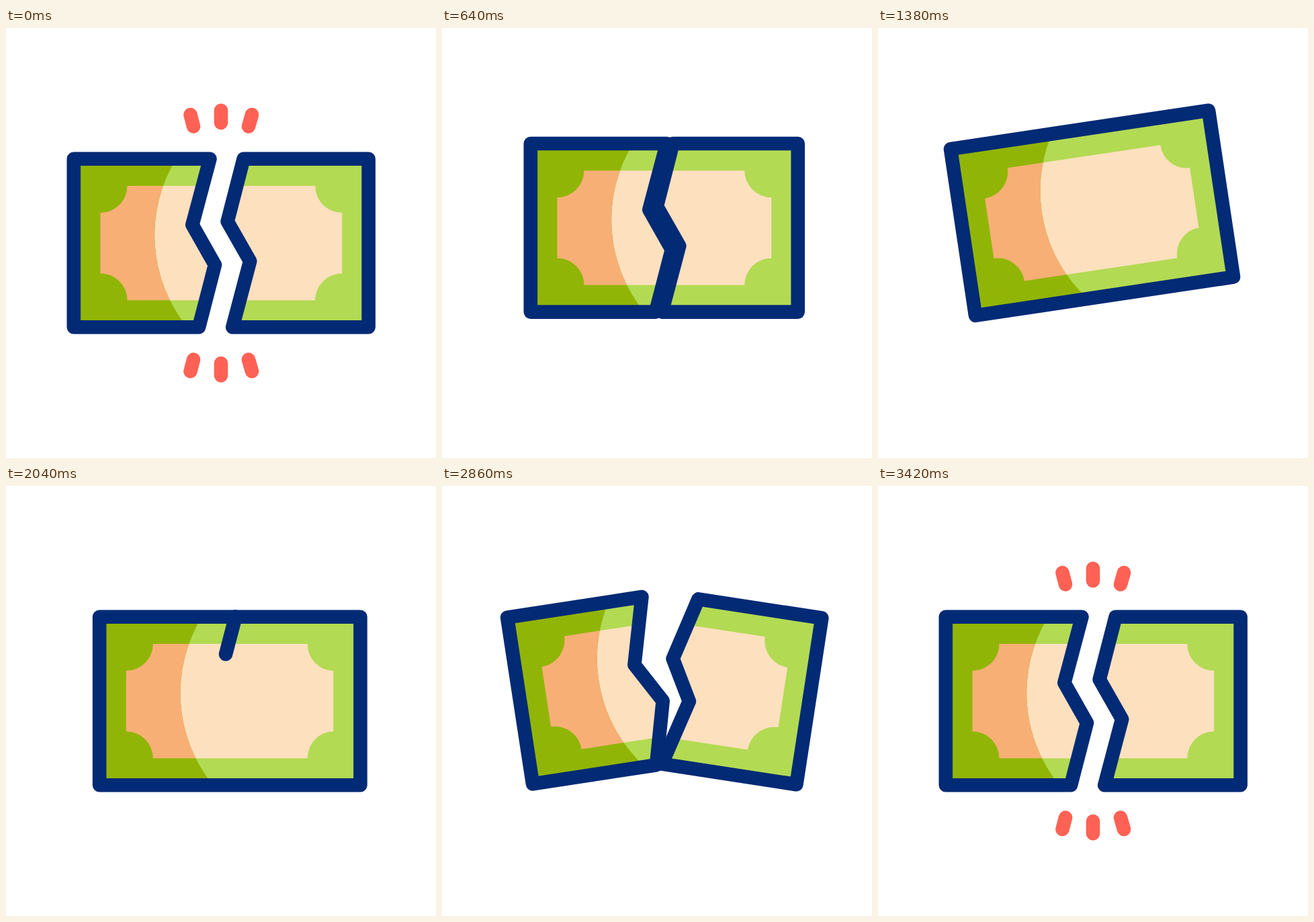
Animation, 640 px wide and 640 px high, one loop 3.6 s. Source, as an HTML page:

```html
<!DOCTYPE html>
<html lang="en">
<head>
<meta charset="utf-8">
<title>Torn banknote</title>
<style>
  html, body { margin: 0; width: 100%; height: 100%; overflow: hidden; background: #fff; }
  svg { display: block; width: 100%; height: 100%; }
  .line { fill: none; stroke: #032a75; stroke-width: 20.6; stroke-linejoin: round; stroke-linecap: round; }
  .spark { stroke: #ff6254; stroke-width: 20.6; stroke-linecap: round; }
</style>
</head>
<body>
<svg id="stage" viewBox="0 0 640 640"></svg>
<script>
const LOOP = 3600;
const TOP = 194.7, BOTTOM = 445.3, LEFT = 139.1, RIGHT = 527.4;
const GAP_LEFT = 38.3, GAP_RIGHT = 12.2;

const outlines = {
  whole: `M${LEFT} ${TOP}H${RIGHT}V${BOTTOM}H${LEFT}Z`,
  left: `M${LEFT} ${TOP}H341.8L315.6 293L349.3 352.5L325.3 ${BOTTOM}H${LEFT}Z`,
  right: `M${RIGHT} ${TOP}H341.4L317.4 288L351 347L325 ${BOTTOM}H${RIGHT}Z`
};
const crackPath = `M341.6 ${TOP}L316.5 290.5L350 350L325.2 ${BOTTOM}`;
const shadePath = `M${LEFT} ${TOP}H291.6A217 217 0 0 0 308.2 ${BOTTOM}H${LEFT}Z`;

// Inner panel with four concave corners
function panel(right, rx) {
  const l = 178.8, t = 235, b = 405.2, r = 40;
  return `M${l + r} ${t}H${right - rx}A${rx} ${r} 0 0 0 ${right} ${t + r}V${b - r}` +
    `A${rx} ${r} 0 0 0 ${right - rx} ${b}H${l + r}A${r} ${r} 0 0 0 ${l} ${b - r}V${t + r}` +
    `A${r} ${r} 0 0 0 ${l + r} ${t}Z`;
}

function note(id, right, rx, shaded) {
  const face = panel(right, rx), edge = outlines[id];
  const shade = shaded ? `<g clip-path="url(#shade)">
      <path d="${outlines.whole}" fill="#91b506"/><path d="${face}" fill="#f7af75"/></g>` : '';
  return `<clipPath id="clip-${id}"><path d="${edge}"/></clipPath>
    <g id="${id}"><g clip-path="url(#clip-${id})">
      <path d="${outlines.whole}" fill="#b2da53"/><path d="${face}" fill="#fde0be"/>${shade}
    </g><path class="line" d="${edge}"/></g>`;
}

// Sparks as [inner x, inner y, outer x, outer y]
const topSparks = [[279, 146.5, 274.5, 129], [320, 141, 320, 122.7], [361, 146.5, 366, 129]];
const tearSparks = [...topSparks, ...topSparks.map(([a, b, c, d]) => [a, 640 - b, c, 640 - d])];
const slamSparks = [[517.5, 143, 526.5, 127.5], [551, 171, 563.5, 158.5], [573, 203.5, 588.5, 194.5]];
const sparkLines = (list, id) =>
  `<g id="${id}">${list.map(() => '<line class="spark"/>').join('')}</g>`;

const stage = document.getElementById('stage');
stage.innerHTML = `<clipPath id="shade"><path d="${shadePath}"/></clipPath>` +
  note('whole', 487.2, 38.4, true) + note('left', 488, 40, true) + note('right', 488, 40, false) +
  `<path id="crack" class="line" d="${crackPath}" pathLength="100"/>` +
  sparkLines(tearSparks, 'tear') + sparkLines(slamSparks, 'slam');

const part = {};
for (const id of ['whole', 'left', 'right', 'crack', 'tear', 'slam']) {
  part[id] = document.getElementById(id);
}

const span = (t, from, to) => Math.min(1, Math.max(0, (t - from) / (to - from)));
const ease = (t, from, to) => (1 - Math.cos(Math.PI * span(t, from, to))) / 2;
const mix = (a, b, k) => a + (b - a) * k;
const show = (el, on) => el.setAttribute('visibility', on ? 'visible' : 'hidden');

function place(el, x, y, angle, px, py) {
  el.setAttribute('transform', `translate(${x} ${y}) rotate(${angle} ${px} ${py})`);
}

// Draws the stretch from..to of each spark, 0 at its inner end
function drawSparks(group, list, from, to, dy = 0) {
  show(group, to > from);
  group.setAttribute('transform', `translate(0 ${dy})`);
  list.forEach(([x1, y1, x2, y2], i) => {
    const line = group.children[i];
    line.setAttribute('x1', mix(x1, x2, from));
    line.setAttribute('y1', mix(y1, y2, from));
    line.setAttribute('x2', mix(x1, x2, to));
    line.setAttribute('y2', mix(y1, y2, to));
  });
}

function drawHalves(t, hop) {
  if (t < 750) {
    const apart = 1 - span(t, 220, 740);
    place(part.left, -GAP_LEFT * apart, hop, 0, 0, 0);
    place(part.right, GAP_RIGHT * apart, hop, 0, 0, 0);
    return;
  }
  const settle = ease(t, 3060, 3420);
  const open = 12.8 * ease(t, 2540, 3060);
  const angle = open * (1 - settle);
  place(part.left, mix(-0.47 * open, -GAP_LEFT, settle), -0.22 * angle, -angle, LEFT, BOTTOM);
  place(part.right, mix(0, GAP_RIGHT, settle), -0.12 * angle, angle, RIGHT, BOTTOM);
}

function draw(t) {
  const joined = t >= 750 && t < 2540;
  show(part.whole, joined);
  show(part.left, !joined);
  show(part.right, !joined);

  const u = span(t, 220, 740);
  const hop = -36.8 * 4 * u * (1 - u);
  drawHalves(t, hop);

  const tilt = 10.9 * (ease(t, 900, 1300) - ease(t, 1300, 1560));
  place(part.whole, 0, 0, -tilt, 25, 397);

  const torn = span(t, 1920, 2480) * 100;
  show(part.crack, joined && torn > 0);
  part.crack.setAttribute('stroke-dasharray', `${torn} 200`);

  if (t < 750) drawSparks(part.tear, tearSparks, span(t, 220, 540), 1, hop);
  else drawSparks(part.tear, tearSparks, 0, span(t, 3240, 3420));
  drawSparks(part.slam, slamSparks, span(t, 1740, 1930), span(t, 1540, 1740));
}

const start = performance.now();
function tick() {
  draw((performance.now() - start) % LOOP);
  requestAnimationFrame(tick);
}
tick();
</script>
</body>
</html>
```
